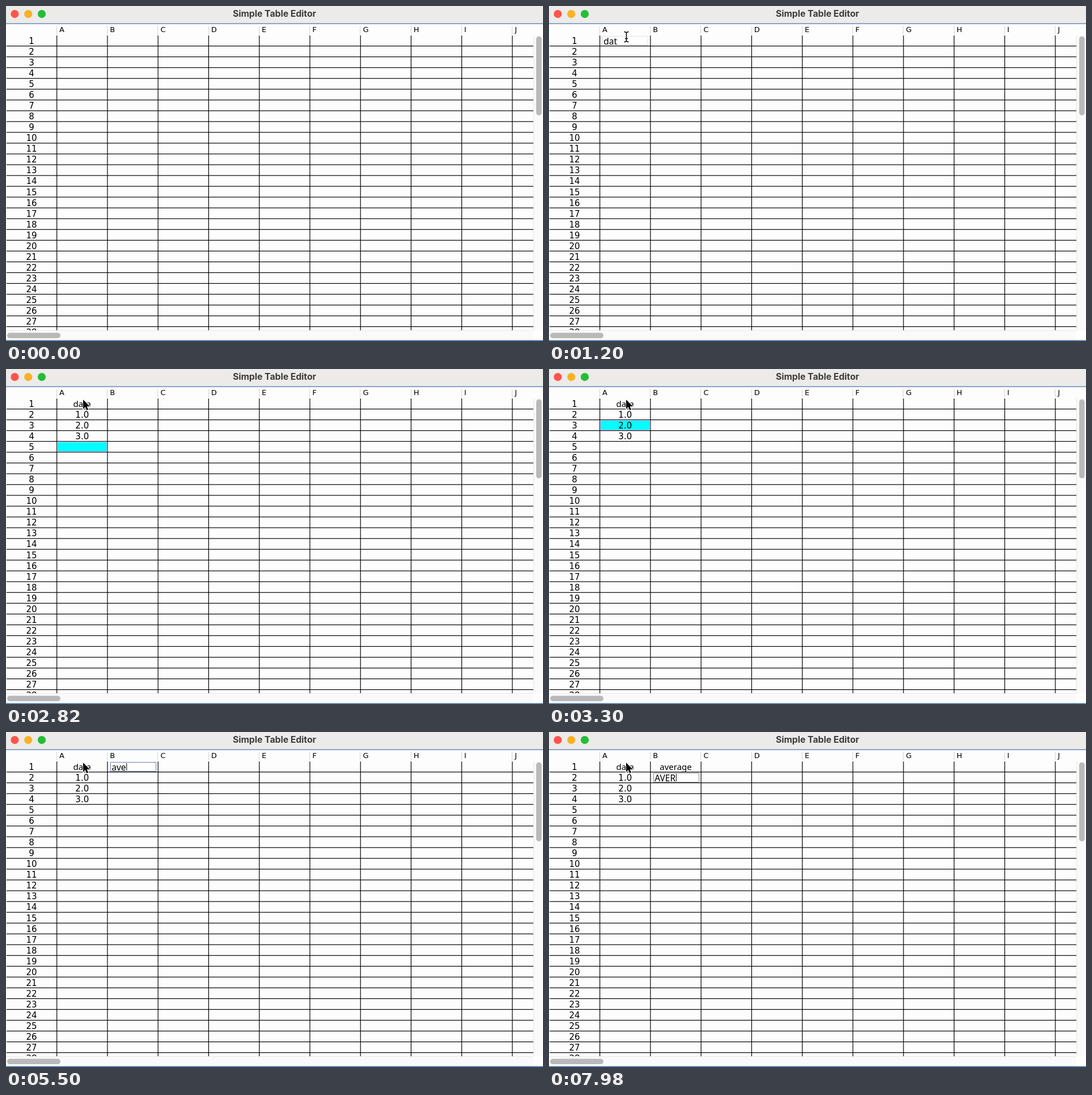
Recreate the animation shown at these times as an HTML page with a canvas. Size 947 px wide and 591 px high, loop 8 s.

```html
<!DOCTYPE html>
<html lang="en">
<head>
<meta charset="utf-8">
<title>Simple Table Editor</title>
<style>
  html, body { margin: 0; width: 100%; height: 100%; overflow: hidden; background: #fff; }
  canvas { display: block; width: 947px; height: 591px; }
</style>
</head>
<body>
<canvas id="stage" width="947" height="591"></canvas>
<script>
const ctx = document.getElementById('stage').getContext('2d');
const W = 947, H = 591, LOOP = 8000;
// Window points are shown enlarged; cells are 75 by 16 points.
const POINT = 1.19, COL = 75 * POINT, ROW = 16 * POINT;
const LEFT = 90.25, TOP = 52.15, RIGHT = 930, BOTTOM = 572;
const DIGITS = '"DejaVu Sans", sans-serif', WORDS = '"Noto Sans", sans-serif';

// Editing sessions: the field opens, keys arrive at a steady gap, Enter commits.
const edits = [
  { open: 600, key: 850, gap: 150, commit: 1480, col: 0, row: 0, typed: 'data', value: 'data', border: '#e2e2e2' },
  { open: 1640, key: 1700, gap: 0, commit: 1840, col: 0, row: 1, typed: '1', value: '1.0' },
  { open: 2000, key: 2060, gap: 0, commit: 2200, col: 0, row: 2, typed: '2', value: '2.0' },
  { open: 2360, key: 2420, gap: 0, commit: 2580, col: 0, row: 3, typed: '3', value: '3.0' },
  { open: 4860, key: 5100, gap: 160, commit: 6240, col: 1, row: 0, typed: 'average', value: 'average' },
  { open: 6900, key: 7240, gap: 210, commit: 9000, col: 1, row: 1, typed: 'AVERAGE', value: '', border: '#8a8a96' }
];

// Selected cell from each time on: [ms, column, row]
const selections = [
  [420, 0, 0], [1480, 0, 1], [1840, 0, 2], [2200, 0, 3], [2580, 0, 4],
  [3080, 0, 3], [3260, 0, 2], [3440, 0, 1], [3620, 0, 0], [3900, 1, 0], [6240, 1, 1]
];

const cellX = col => LEFT + col * COL;
const cellY = row => TOP + row * ROW;

function rect(x, y, w, h, color) {
  ctx.fillStyle = color;
  ctx.fillRect(x, y, w, h);
}

function pill(x, y, w, h, color) {
  ctx.fillStyle = color;
  ctx.beginPath();
  ctx.roundRect(x, y, w, h, Math.min(w, h) / 2);
  ctx.fill();
}

function text(str, x, y, font, align = 'center', color = '#000') {
  ctx.font = font;
  ctx.textAlign = align;
  ctx.fillStyle = color;
  ctx.fillText(str, x, y);
}

function cellText(str, x, row) {
  const font = /\d/.test(str) ? `15px ${DIGITS}` : `500 15px ${WORDS}`;
  text(str, x, cellY(row) + 14.8, font);
}

function drawTitleBar() {
  rect(0, 0, W, 31, '#ecebe9');
  rect(0, 30.5, W, 1.2, '#4770ad');
  ['#ff544d', '#f9b125', '#23be35'].forEach((color, i) =>
    pill(8.3 + i * 20 * POINT, 6.9, 12 * POINT, 12 * POINT, color));
  text('Simple Table Editor', W / 2, 19, '700 15.7px Inter, sans-serif', 'center', '#3b3b3a');
}

function drawHeader() {
  for (let col = 0; col < 10; col++) {
    rect(Math.floor(cellX(col)) - 1, 35, 1, 15, '#d4d4d4');
    text('ABCDEFGHIJ'[col], cellX(col) + 3.8, 46.3, `13px ${DIGITS}`, 'left');
  }
}

function drawGrid() {
  for (let row = 0; row < 28; row++) {
    cellText(String(row + 1), 45, row);
    rect(1, cellY(row + 1) - POINT, RIGHT - 1, POINT, '#000');
  }
  for (let col = 0; col < 10; col++) rect(cellX(col) - POINT, 52, POINT, BOTTOM - 52, '#000');
}

function drawSelection(col, row) {
  const x = cellX(col), y = cellY(row), w = COL - POINT, h = ROW - POINT;
  rect(x, y, w, h, '#a6c4ff');
  rect(x + POINT, y + POINT, w - 2 * POINT, h - 2 * POINT, '#00ffff');
}

function drawField(edit, t) {
  const x = Math.round(cellX(edit.col) + 4), y = Math.round(cellY(edit.row) + 1);
  rect(x, y, 80, 17, '#fff');
  ctx.strokeStyle = edit.border || '#7480ad';
  ctx.lineWidth = 1;
  ctx.strokeRect(x + 0.5, y + 0.5, 80, 16);

  const count = t < edit.key ? 0 : edit.gap ? 1 + Math.floor((t - edit.key) / edit.gap) : 1;
  const typed = edit.typed.slice(0, count);
  text(typed, x + 2.2, y + 14.5, `15.5px ${WORDS}`, 'left');
  if (t % 1000 >= 480) rect(x + 3 + ctx.measureText(typed).width, y + 2, 1, 13, '#000');
}

function drawArrow(x, y) {
  const points = [[0, 0], [0, 16.5], [3.8, 13], [6.3, 18.7], [9, 17.5], [6.6, 12], [11.8, 12]];
  ctx.beginPath();
  points.forEach(([dx, dy]) => ctx.lineTo(x + dx, y + dy));
  ctx.closePath();
  ctx.lineJoin = 'round';
  ctx.strokeStyle = '#fff';
  ctx.lineWidth = 2;
  ctx.stroke();
  ctx.fillStyle = '#000';
  ctx.fill();
}

function drawIBeam(x, y) {
  const path = new Path2D(`M${x - 4} ${y - 9}q4 0 4 3v12q0 3-4 3M${x + 4} ${y - 9}q-4 0-4 3v12q0 3 4 3M${x - 2.5} ${y + 3}h5`);
  for (const [color, width] of [['#fff', 3.2], ['#000', 1.5]]) {
    ctx.strokeStyle = color;
    ctx.lineWidth = width;
    ctx.stroke(path);
  }
}

function drawScrollbars() {
  rect(RIGHT, 52, W - RIGHT, BOTTOM - 52, '#fafafa');
  rect(RIGHT, 52, 1, BOTTOM - 52, '#e6e6e6');
  rect(0, BOTTOM, RIGHT, H - BOTTOM, '#fafafa');
  rect(RIGHT, BOTTOM, W - RIGHT, H - BOTTOM, '#fff');
  rect(0, BOTTOM, RIGHT, 1, '#e9e9e9');
  pill(935, 53.5, 9.6, 139.5, '#b9b9b9');
  pill(2, 576.5, 94, 9.6, '#b9b9b9');
  rect(0, 589.6, W, 1.4, '#3f72ad');
}

function render(t) {
  rect(0, 0, W, H, '#fdfdfd');
  drawHeader();

  ctx.save();
  ctx.beginPath();
  ctx.rect(0, 52, RIGHT, BOTTOM - 52);
  ctx.clip();
  drawGrid();
  for (const e of edits)
    if (t >= e.commit) cellText(e.value, cellX(e.col) + (COL - POINT) / 2, e.row);
  const active = edits.find(e => t >= e.open && t < e.commit);
  const selected = selections.filter(([start]) => t >= start).pop();
  if (active) drawField(active, t);
  else if (selected) {
    const [, col, row] = selected;
    drawSelection(col, row);
    const filled = edits.find(e => e.col === col && e.row === row && t >= e.commit);
    if (filled) cellText(filled.value, cellX(col) + (COL - POINT) / 2, row);
  }
  ctx.restore();

  drawScrollbars();
  drawTitleBar();
  if (t >= 640 && t < 1480) drawIBeam(136.5, 54.5);
  else if (t >= 300) drawArrow(136, 54);
}

function tick(now) {
  render(now % LOOP);
  requestAnimationFrame(tick);
}
requestAnimationFrame(tick);
</script>
</body>
</html>
```
